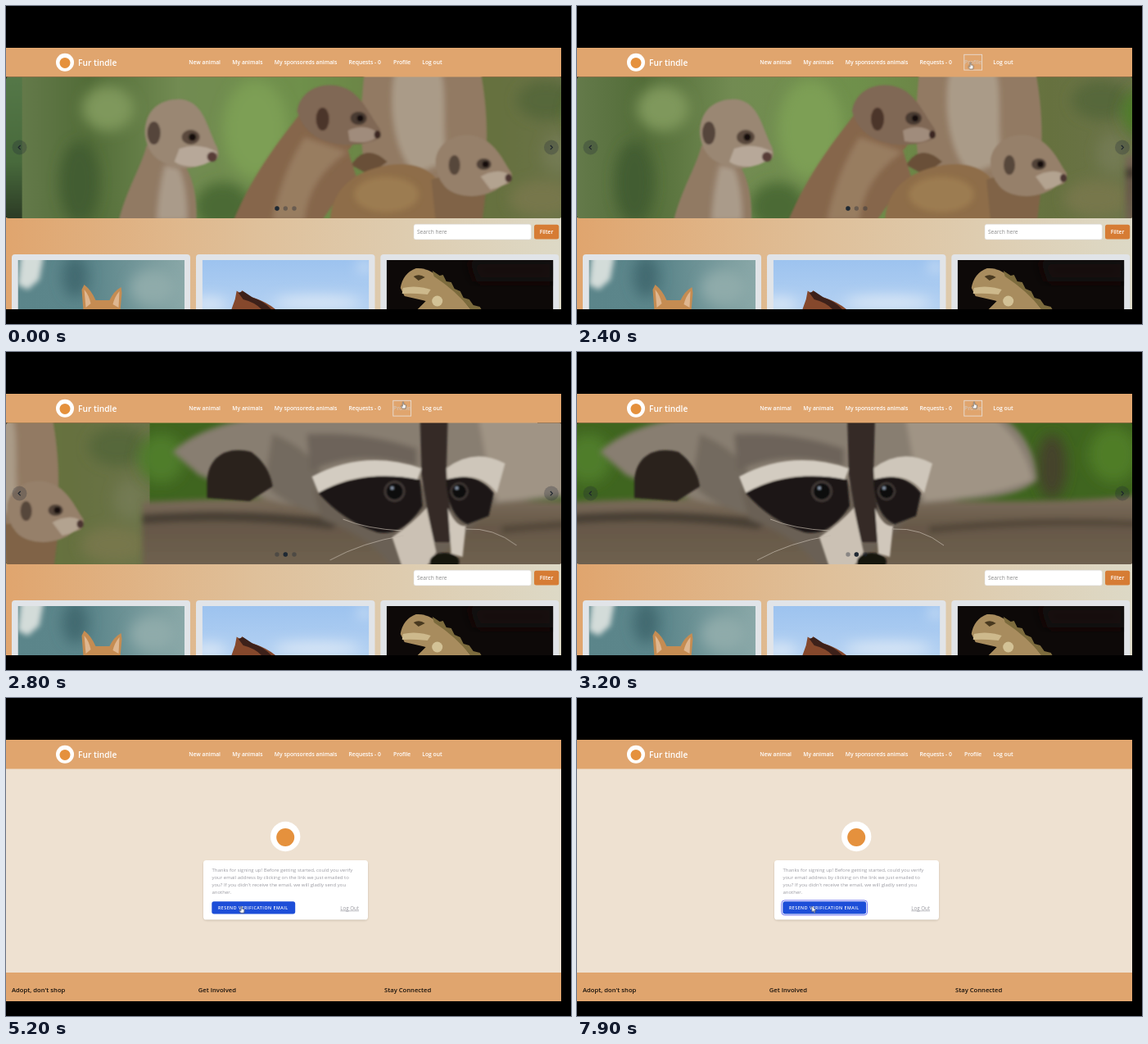
These frames come from a looping animation (690x388 px, 8000 ms). An HTML page:

```html
<!DOCTYPE html>
<html lang="en">
<head>
<meta charset="utf-8">
<title>Animal adoption site</title>
<style>
  html, body { margin: 0; width: 100%; height: 100%; overflow: hidden; background: #000; }
  svg { display: block; width: 690px; height: 388px; font-family: "Open Sans", "Noto Sans", sans-serif; }
  .nav { font-size: 6.75px; font-weight: 600; fill: #fff; }
  .brand { font-size: 10.2px; font-weight: 600; fill: #fff; }
  .note { font-size: 6.03px; fill: #9b9ba2; }
  .foot { font-size: 7.65px; font-weight: 600; fill: #16110c; }
  .soft { filter: url(#soft); }
  .fur { filter: url(#fur); }
  .haze { filter: url(#haze); }

  .home, .verify, .dots1, .dots2, .focus, .arrow, .hand, .beam, .ring {
    animation: 8s step-end infinite;
  }
  .home { animation-name: home; }
  .verify { animation-name: verify; }
  .dots1 { animation-name: dots1; }
  .dots2 { animation-name: dots2; }
  .focus { animation-name: focus; }
  .ring { animation-name: ring; }
  .arrow { animation-name: arrow; }
  .hand { animation-name: hand; }
  .beam { animation-name: beam; }
  .track { animation: track 8s linear infinite; }
  .profile { animation: profile 8s linear infinite; }
  .send { animation: send 8s linear infinite; }
  .cursor { animation: cursor 8s ease-in-out infinite; }

  @keyframes home { 0% { opacity: 1 } 42.5%, 100% { opacity: 0 } }
  @keyframes verify { 0% { opacity: 0 } 42.5%, 100% { opacity: 1 } }
  @keyframes dots1 { 0% { opacity: 1 } 30.86%, 100% { opacity: 0 } }
  @keyframes dots2 { 0% { opacity: 0 } 30.86%, 100% { opacity: 1 } }
  @keyframes focus { 0% { opacity: 0 } 27.5% { opacity: 1 } 42.5%, 100% { opacity: 0 } }
  @keyframes ring { 0% { opacity: 0 } 76.25%, 100% { opacity: 1 } }
  @keyframes track {
    0% { transform: translateX(20px); animation-timing-function: cubic-bezier(.2, .6, .4, 1) }
    1.85% { transform: none }
    30.86% { transform: none; animation-timing-function: cubic-bezier(.4, 0, .2, 1) }
    39.61%, 100% { transform: translateX(-679px) }
  }
  @keyframes profile {
    0%, 21.8% { fill: #fff }
    23.7%, 42.49% { fill: #d8c3b1 }
    42.5%, 100% { fill: #fff }
  }
  @keyframes send {
    0%, 62% { fill: #60a5fa }
    63.9%, 76.25% { fill: #1d4ed8 }
    78.1%, 80.5% { fill: #1e3a8a }
    82.4%, 100% { fill: #1d4ed8 }
  }
  @keyframes cursor {
    0%, 6.25% { transform: translate(610px, 366px) }
    11.25% { transform: translate(600px, 296px) }
    22.5% { transform: translate(482px, 70px) }
    30% { transform: translate(480.5px, 68.5px) }
    33.75%, 42.5% { transform: translate(485px, 60.5px) }
    48.75%, 57.5% { transform: translate(302px, 231px) }
    63%, 86% { transform: translate(287.5px, 253.8px) }
    86.25%, 100% { transform: translate(286.7px, 253.8px) }
  }
  @keyframes arrow {
    0% { opacity: 0 } 6.25% { opacity: 1 } 21.8% { opacity: 0 }
    43.2% { opacity: 1 } 47.5% { opacity: 0 } 86.25%, 100% { opacity: 1 }
  }
  @keyframes hand {
    0% { opacity: 0 } 21.8% { opacity: 1 } 43.2% { opacity: 0 }
    62% { opacity: 1 } 86.25%, 100% { opacity: 0 }
  }
  @keyframes beam { 0% { opacity: 0 } 47.5% { opacity: 1 } 62%, 100% { opacity: 0 } }
</style>
</head>
<body>
<svg viewBox="0 0 690 388" xmlns="http://www.w3.org/2000/svg">
  <defs>
    <filter id="soft" x="-5%" y="-5%" width="110%" height="110%"><feGaussianBlur stdDeviation="1.1"/></filter>
    <filter id="fur" x="-10%" y="-10%" width="120%" height="120%"><feGaussianBlur stdDeviation="3"/></filter>
    <filter id="haze" x="-20%" y="-20%" width="140%" height="140%"><feGaussianBlur stdDeviation="8"/></filter>
    <clipPath id="page"><path d="M0 51H678V370H0z"/></clipPath>
    <clipPath id="stage"><rect y="86.5" width="678.5" height="172.5" rx="3"/></clipPath>
    <clipPath id="photo"><path d="M0 0H203.5V60H0z"/></clipPath>
    <linearGradient id="sand">
      <stop offset="0" stop-color="#e0a56e"/><stop offset=".45" stop-color="#dfc09a"/><stop offset="1" stop-color="#ddd9c6"/>
    </linearGradient>
    <linearGradient id="meadow">
      <stop offset="0" stop-color="#647a4a"/><stop offset=".12" stop-color="#526c38"/><stop offset=".28" stop-color="#728b52"/>
      <stop offset=".5" stop-color="#6f904b"/><stop offset=".85" stop-color="#66713f"/><stop offset="1" stop-color="#6c744a"/>
    </linearGradient>
    <linearGradient id="edge" x2="0" y2="1">
      <stop offset="0" stop-color="#557848"/><stop offset=".6" stop-color="#486a3c"/><stop offset="1" stop-color="#2c3b25"/>
    </linearGradient>
    <linearGradient id="teal">
      <stop offset="0" stop-color="#5b858a"/><stop offset=".45" stop-color="#5c868b"/><stop offset="1" stop-color="#8aa8a8"/>
    </linearGradient>
    <linearGradient id="sky" x2="0" y2="1">
      <stop offset="0" stop-color="#9dc3ef"/><stop offset="1" stop-color="#b4d1f2"/>
    </linearGradient>
    <linearGradient id="log" x2="0" y2="1">
      <stop offset="0" stop-color="#7e6f5c"/><stop offset=".4" stop-color="#665848"/><stop offset="1" stop-color="#716351"/>
    </linearGradient>
  </defs>

  <rect width="690" height="388"/>
  <g clip-path="url(#page)">

    <g class="home">
      <rect y="258" width="679" height="113" fill="url(#sand)"/>

      <g clip-path="url(#stage)">
        <g class="track">
          <rect x="-40" y="86" width="41" height="174" fill="url(#edge)"/>

          <!-- meerkats -->
          <rect y="86" width="680" height="174" fill="url(#meadow)"/>
          <g class="haze">
            <ellipse cx="105" cy="125" rx="32" ry="28" fill="#7f985b"/>
            <ellipse cx="70" cy="215" rx="24" ry="50" fill="#435d30"/>
            <ellipse cx="285" cy="150" rx="40" ry="60" fill="#7d9f55"/>
            <ellipse cx="245" cy="245" rx="34" ry="30" fill="#4c6b35"/>
            <ellipse cx="640" cy="115" rx="36" ry="24" fill="#56683a"/>
            <ellipse cx="635" cy="235" rx="40" ry="22" fill="#77774c"/>
            <ellipse cx="655" cy="180" rx="20" ry="24" fill="#737a52"/>
          </g>
          <g class="soft">
            <path d="M418 80C414 120 410 165 422 215L560 220C572 180 568 120 560 80z" fill="#927a63"/>
            <path d="M455 80C446 120 454 180 480 205L520 190C512 150 520 110 512 80z" fill="#aa9b88" class="fur"/>
            <path d="M402 194Q420 166 446 190L424 206z" fill="#695039"/>

            <path d="M342 128C318 160 284 200 258 262H366L384 236 408 208 398 176Q412 164 396 152z" fill="#86664b"/>
            <path d="M345 160Q318 200 305 262H345Q350 210 398 178z" fill="#987d60" class="fur"/>
            <path d="M336 128C340 102 368 90 394 100C414 108 424 132 437 150Q440 164 424 166C396 174 346 170 336 128z" fill="#806755"/>
            <path d="M398 152Q420 142 436 156 428 170 400 165z" fill="#a08c7b"/>
            <ellipse cx="367" cy="138" rx="8" ry="14" fill="#4b362a"/>
            <ellipse cx="411" cy="137" rx="10" ry="8" fill="#493b31"/>
            <circle cx="413" cy="137" r="4" fill="#15110f"/>
            <ellipse cx="434" cy="157" rx="4" ry="5" fill="#3b2823"/>

            <path d="M152 170C146 196 128 222 118 262H213C214 236 210 210 196 190z" fill="#917a64"/>
            <path d="M174 194Q166 226 164 262H202Q202 220 192 198z" fill="#aa9b8a" class="fur"/>
            <path d="M150 155C150 124 172 112 196 114C222 118 226 148 238 172Q244 188 230 190C214 196 200 202 182 194C164 190 152 178 150 155z" fill="#9a8773"/>
            <path d="M192 174Q216 166 238 178 234 192 212 196 194 196 186 190z" fill="#b7a899"/>
            <ellipse cx="161" cy="155" rx="8" ry="14" fill="#54443a"/>
            <ellipse cx="206" cy="160" rx="11" ry="9" fill="#5a493d"/>
            <circle cx="208" cy="160" r="4.5" fill="#13100f"/>
            <ellipse cx="232" cy="184" rx="6" ry="6" fill="#593d38"/>

            <path d="M376 262C378 220 410 200 448 194C492 188 520 208 522 262z" fill="#8e6d48"/>
            <ellipse cx="445" cy="230" rx="40" ry="22" fill="#9c7b51" class="fur"/>
            <path d="M500 212Q530 200 566 230L562 262H505z" fill="#806447"/>
            <path d="M505 188C508 164 534 152 558 160C580 168 588 190 598 204Q600 218 586 219C568 236 530 236 516 220Q504 206 505 188z" fill="#96806b"/>
            <path d="M560 208Q582 196 597 207 594 220 572 224z" fill="#b3a390"/>
            <ellipse cx="528" cy="194" rx="7" ry="12" fill="#57463a"/>
            <ellipse cx="564" cy="193" rx="9" ry="7" fill="#514238"/>
            <circle cx="566" cy="193" r="4" fill="#14100e"/>
            <ellipse cx="594" cy="210" rx="4" ry="5" fill="#4c3530"/>
          </g>

          <!-- raccoon -->
          <g transform="translate(679)">
            <rect y="86" width="680" height="174" fill="#3f651f"/>
            <g class="haze">
              <ellipse cx="14" cy="130" rx="28" ry="30" fill="#507d2a"/>
              <ellipse cx="655" cy="125" rx="30" ry="34" fill="#507d28"/>
              <ellipse cx="580" cy="140" rx="18" ry="40" fill="#45432a"/>
            </g>
            <g class="fur">
              <path d="M-9 183Q200 174 400 180T690 174V272H-9z" fill="url(#log)"/>
              <path d="M-9 198Q120 188 240 206L220 216Q110 202 -9 210z" fill="#4a3f34"/>
              <path d="M430 212Q560 198 690 206V214Q560 208 430 222z" fill="#54483b"/>
              <path d="M28 122C58 92 120 76 190 74H510C548 94 560 126 562 156Q540 178 470 180L260 200Q150 190 60 150z" fill="#887e71"/>
              <path d="M400 74H500Q544 104 556 156 500 178 420 182z" fill="#a09485"/>
              <path d="M150 100Q200 120 216 160L214 200Q160 186 140 160z" fill="#736a5e"/>
              <path d="M200 168L330 160 372 172 424 176Q400 214 330 268H296Q280 230 210 204z" fill="#6b6055"/>
              <path d="M192 100Q262 96 326 118V140Q250 118 196 146z" fill="#6d645a"/>
            </g>
            <g class="soft">
              <path d="M70 156C72 128 94 114 124 122Q146 138 150 164L122 182 70 178z" fill="#29231f"/>
              <path d="M198 152Q262 118 332 142L326 158Q260 140 206 172z" fill="#d3ccc1"/>
              <path d="M362 142Q396 116 434 136L424 172Q400 142 364 158z" fill="#cec6ba"/>
              <path d="M330 80H364L362 152 372 232H346L332 150z" fill="#342c28"/>
              <path d="M206 172Q262 142 330 156L333 188Q308 226 278 220 236 206 206 172z" fill="#1b1614"/>
              <path d="M362 156Q398 144 420 172L414 200 388 210Q364 200 362 156z" fill="#1a1614"/>
              <path d="M296 226Q322 208 338 190L350 244 338 262H308z" fill="#cbc1b4"/>
              <path d="M364 190Q374 214 386 212L382 250 368 246z" fill="#d0c7bb"/>
              <ellipse cx="360" cy="256" rx="18" ry="11" fill="#151211"/>
              <g fill="#3f3936"><circle cx="299" cy="170" r="13"/><circle cx="378" cy="170" r="11"/></g>
              <g fill="#07090c"><circle cx="299" cy="170" r="10"/><circle cx="378" cy="170" r="8.5"/></g>
              <g fill="#8f9db0"><circle cx="296" cy="166" r="2"/><circle cx="375" cy="166" r="2"/></g>
            </g>
            <path d="M310 224Q260 232 220 254M308 218Q266 216 236 204M386 216Q420 214 448 236" fill="none" stroke="#c4bbae" stroke-width=".7"/>
          </g>
        </g>

        <g fill="#1f2937" opacity=".38"><circle cx="331" cy="247" r="2.7"/><circle cx="341.3" cy="247" r="2.7"/><circle cx="352" cy="247" r="2.7"/></g>
        <circle class="dots1" cx="331" cy="247" r="2.7" fill="#1f2933"/>
        <circle class="dots2" cx="341.3" cy="247" r="2.7" fill="#1f2933"/>
        <g fill="#1f2937" opacity=".28"><circle cx="16.5" cy="172.5" r="9"/><circle cx="666" cy="172.5" r="9"/></g>
        <path d="M17.7 170l-2.6 2.6 2.6 2.6M664.8 170l2.6 2.6-2.6 2.6" fill="none" stroke="#1b222b" stroke-width="1.1"/>
      </g>

      <rect x="498" y="266.3" width="143.3" height="18.6" rx="2.5" fill="#fff" stroke="#d9d9da" stroke-width=".5"/>
      <text x="502" y="278.2" font-size="6.6" fill="#8b8b8b">Search here</text>
      <rect x="645" y="266.7" width="30.2" height="17.8" rx="2.5" fill="#d67c34"/>
      <text x="660" y="278.1" font-size="6.7" font-weight="600" fill="#fff" text-anchor="middle">Filter</text>

      <g fill="#e1e4e8">
        <rect x="7" y="303" width="218" height="80" rx="4"/>
        <rect x="232" y="303" width="218.5" height="80" rx="4"/>
        <rect x="457.3" y="303" width="218" height="80" rx="4"/>
      </g>
      <g transform="translate(14.5 310)" clip-path="url(#photo)">
        <rect width="204" height="60" fill="url(#teal)"/>
        <g class="haze"><ellipse cx="70" cy="20" rx="16" ry="26" fill="#436b71"/><ellipse cx="165" cy="34" rx="28" ry="22" fill="#8fabaa"/></g>
        <path class="fur" d="M4 -8H32L26 24 12 36 0 30z" fill="#d3dcd9"/>
        <path d="M80 62L78 36 81 30Q90 37 95 49H112Q117 38 126 33L127 40 125 62z" fill="#c58c52"/>
        <path d="M81 36Q87 43 89 53L83 58zM124 38Q118 45 116 54L123 58z" fill="#dfb790"/>
      </g>
      <g transform="translate(239.7 310)" clip-path="url(#photo)">
        <rect width="204" height="60" fill="url(#sky)"/>
        <g class="haze" fill="#dbe8f6"><ellipse cx="140" cy="52" rx="54" ry="8"/><ellipse cx="8" cy="54" rx="22" ry="8"/><ellipse cx="198" cy="8" rx="8" ry="6"/></g>
        <path d="M35 62L40 48 42 37.5 46 40 49 37 53 43Q72 48 84 56L92 62z" fill="#85482c"/>
        <path d="M44 40L50 38 62 46Q76 50 86 62H74Q66 52 50 48z" fill="#3d211a"/>
      </g>
      <g transform="translate(464.7 310)" clip-path="url(#photo)">
        <rect width="204" height="60" fill="#0d0908"/>
        <path class="haze" d="M100 0H204V26H110z" fill="#180c08"/>
        <path d="M17 34Q20 16 36 10 54 9 66 24 86 36 104 62H36L48 50 22 44z" fill="#a88c5e"/>
        <path d="M20 34Q36 30 54 36L50 42Q34 40 19 41z" fill="#cdb98c"/>
        <path d="M33 20Q40 16 47 21L39 25z" fill="#48391f"/>
        <circle cx="62" cy="50" r="6.5" fill="#d3c296"/>
        <path d="M56 13L65 19 69 18 73 26 79 27 83 35 90 38 94 46 101 48 106 55 114 57 117 62H104Q86 38 58 20z" fill="#7c6b3d"/>
      </g>
    </g>

    <g class="verify">
      <rect y="86" width="679" height="250" fill="#eee1d1"/>
      <rect y="335" width="679" height="36" fill="#e0a56e"/>
      <g class="foot">
        <text x="7" y="358.8">Adopt, don't shop</text>
        <text x="234.7" y="358.8">Get Involved</text>
        <text x="462" y="358.8">Stay Connected</text>
      </g>
      <circle cx="341.2" cy="169" r="18.2" fill="#fff"/>
      <circle cx="341.2" cy="170" r="11" fill="#e5913d"/>
      <rect x="241" y="199.2" width="201" height="72.4" rx="4" fill="#7b6a55" opacity=".3" class="soft"/>
      <rect x="241" y="198" width="201" height="72.5" rx="3.6" fill="#fff"/>
      <g class="note">
        <text x="251.4" y="212.2">Thanks for signing up! Before getting started, could you verify</text>
        <text x="251.4" y="221.2">your email address by clicking on the link we just emailed to</text>
        <text x="251.4" y="230.2">you? If you didn't receive the email, we will gladly send you</text>
        <text x="251.4" y="239.2">another.</text>
        <text x="408.3" y="258.6" font-size="6.2" text-decoration="underline">Log Out</text>
      </g>
      <rect class="ring" x="249.8" y="246.9" width="104.8" height="18" rx="3.8" fill="#fff" stroke="#6366f1" stroke-width=".9"/>
      <rect class="send" x="251.3" y="248.3" width="101.9" height="15.2" rx="2.7"/>
      <text x="259" y="257.9" font-size="5.2" font-weight="600" letter-spacing=".53" fill="#fff">RESEND VERIFICATION EMAIL</text>
    </g>

    <rect y="50" width="679" height="36.5" fill="#e0a56e"/>
    <circle cx="72" cy="68.8" r="11" fill="#fff"/>
    <circle cx="72" cy="69.4" r="6.5" fill="#e5913d"/>
    <text class="brand" x="88" y="72.8">Fur tindle</text>
    <g class="nav">
      <text x="223.3" y="71.4">New animal</text>
      <text x="276.3" y="71.4">My animals</text>
      <text x="327.8" y="71.4">My sponsoreds animals</text>
      <text x="418.5" y="71.4">Requests - 0</text>
      <text class="profile" x="473" y="71.4">Profile</text>
      <text x="508.3" y="71.4">Log out</text>
    </g>
    <rect class="focus" x="472.8" y="59.3" width="21.8" height="18.8" fill="none" stroke="#e9ddd4" stroke-width=".9"/>

    <g class="cursor">
      <path class="arrow" d="M0 0V7.4L1.8 5.8 3 8.4 4.2 7.9 3 5.4H5.3z" fill="#fff" stroke="#222" stroke-width=".45"/>
      <path class="hand" d="M-.7 .7Q0 -.5 .7 .7V3.4L3 4Q3.7 4.3 3.6 5.2L3 8.6H-.9L-2.8 5.6Q-2.4 4.6 -1.4 5.4L-.7 6z" fill="#fff" stroke="#222" stroke-width=".5"/>
      <path class="beam" d="M-1.6 -3.8H-.4L0 -3.4 .4 -3.8H1.6M0 -3.4V3.4M-1.6 3.8H-.4L0 3.4 .4 3.8H1.6" fill="none" stroke="#222" stroke-width=".8"/>
    </g>
  </g>
</svg>
</body>
</html>
```
